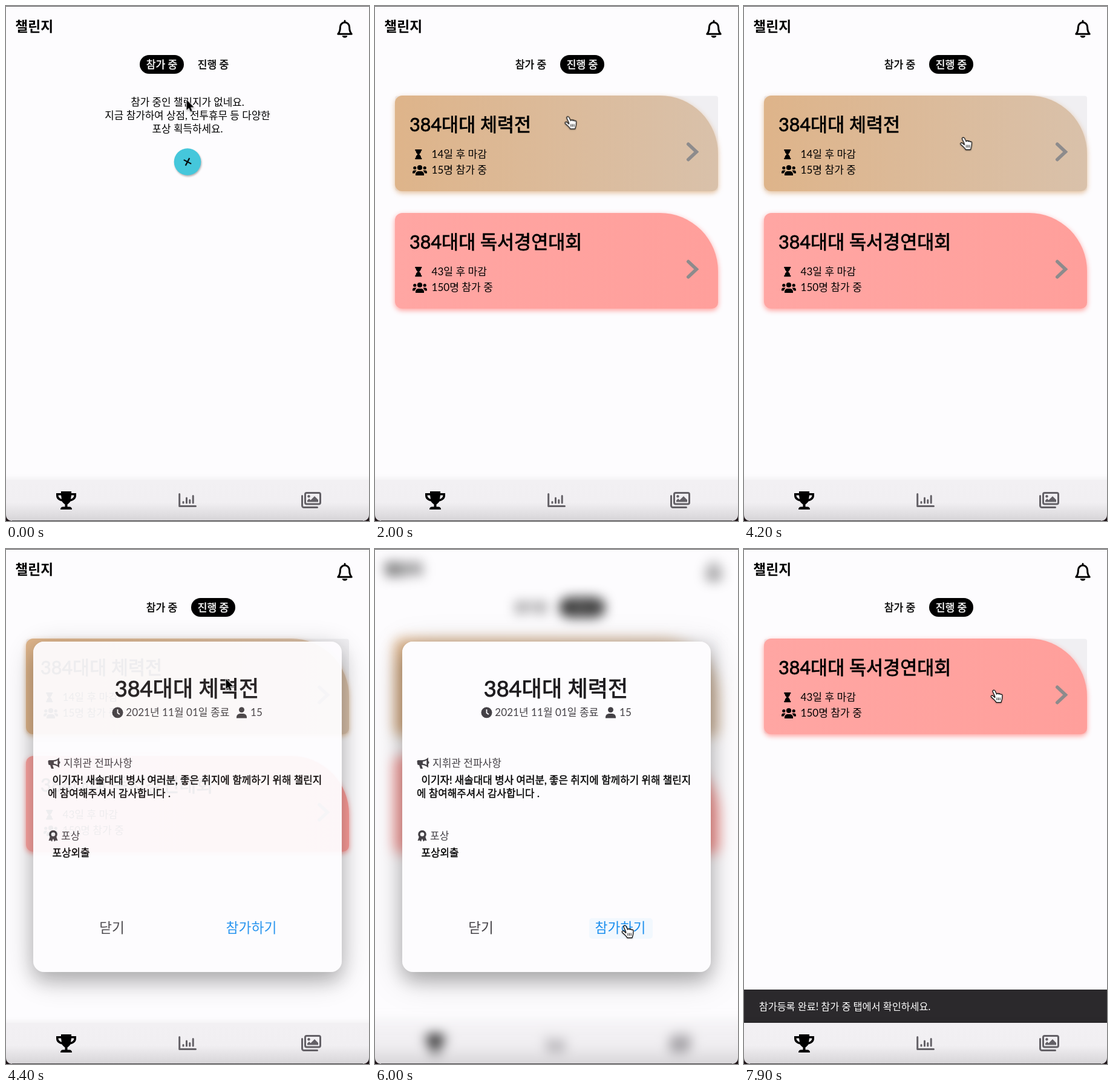
Recreate the animation shown at these times as an HTML page. Size 600x851 px, loop 8 s.

```html
<!DOCTYPE html>
<html lang="ko">
<head>
<meta charset="utf-8">
<title>챌린지</title>
<style>
html, body { margin: 0; width: 100%; height: 100%; overflow: hidden; background: #fdfcfe; }
svg { display: block; width: 600px; height: 851px; }
text {
  font: 17.1px Lato, "Noto Sans CJK KR", "Noto Sans CJK JP", "Noto Sans CJK", sans-serif;
  fill: currentColor; white-space: pre;
}
.body { font-size: 16.85px; }
.mid { text-anchor: middle; }
.medium { stroke: currentColor; stroke-width: .025em; }
.line { fill: none; stroke: currentColor; stroke-width: 3; stroke-linecap: round; stroke-linejoin: round; }
.icon { fill: currentColor; }
.tan { filter: drop-shadow(0 3px 4px rgba(222, 180, 138, .85)); }
.pink { filter: drop-shadow(0 3px 4px rgba(255, 150, 146, .9)); }

/* Every track shares one 8 s clock: 1% = 80 ms */
.a { animation: 8s linear infinite; }
.step { animation-timing-function: step-end; }

#page { animation-name: blur; }
@keyframes blur { 0% { filter: none } 56.25% { filter: blur(10px) } 81.25%, 100% { filter: none } }

#empty { animation-name: empty; }
@keyframes empty { 0% { visibility: visible } 16.25%, 100% { visibility: hidden } }

#tabs { animation-name: tabs; }
@keyframes tabs {
  0% { visibility: visible } 16.25% { visibility: hidden } 21.875% { visibility: visible }
  81.25% { visibility: hidden } 86.875%, 100% { visibility: visible }
}
#pill { animation-name: pill; }
@keyframes pill { 0% { transform: none } 16.25%, 100% { transform: translateX(85px) } }
#tabA { animation-name: tabA; }
@keyframes tabA { 0% { color: #fff } 16.25%, 100% { color: #000 } }
#tabB { animation-name: tabB; }
@keyframes tabB { 0% { color: #000 } 16.25%, 100% { color: #fff } }

#first { animation-name: first; }
@keyframes first { 0% { visibility: hidden } 21.875% { visibility: visible } 81.25%, 100% { visibility: hidden } }
#second { animation-name: second; }
@keyframes second {
  0% { visibility: hidden; transform: translateY(194px) }
  21.875% { visibility: visible; transform: translateY(194px) }
  81.25% { visibility: hidden; transform: none }
  86.875%, 100% { visibility: visible; transform: none }
}
#hover { animation-name: hover; }
@keyframes hover {
  0% { visibility: hidden } 21.875% { visibility: visible } 26% { visibility: hidden }
  40.6% { visibility: visible } 81.25% { visibility: hidden } 95%, 100% { visibility: visible }
}

#plus { animation-name: plus; }
@keyframes plus { from { transform: rotate(28deg) } to { transform: rotate(748deg) } }

#loader { animation-name: loader; }
@keyframes loader {
  0% { visibility: hidden } 16.25% { visibility: visible } 21.875% { visibility: hidden }
  81.25% { visibility: visible } 86.875%, 100% { visibility: hidden }
}
#turn { animation-name: turn; }
@keyframes turn {
  0%, 16.25% { transform: rotate(-90deg) } 24.58% { transform: rotate(63deg) }
  24.59%, 81.25% { transform: rotate(-90deg) } 89.58%, 100% { transform: rotate(63deg) }
}
#arc { animation-name: arc; animation-timing-function: cubic-bezier(.4, 0, .2, 1); }
@keyframes arc {
  0%, 16.25% { stroke-dasharray: 0 400 } 24.58% { stroke-dasharray: 270 400 }
  24.59%, 81.25% { stroke-dasharray: 0 400 } 89.58%, 100% { stroke-dasharray: 270 400 }
}

#toast { animation-name: toast; animation-timing-function: cubic-bezier(.4, 0, .2, 1); }
@keyframes toast { 0%, 81.25% { transform: translateY(55px) } 84.375%, 100% { transform: none } }
#note { animation-name: note; }
@keyframes note { 0%, 82.5% { opacity: 0 } 84.375%, 100% { opacity: 1 } }

#dialog { animation-name: dialog; }
@keyframes dialog {
  0% { opacity: 0 }
  53.5% { opacity: 0; animation-timing-function: ease-out }
  55.375% { opacity: 1 }
  81.25% { opacity: 1; animation-timing-function: ease-in }
  83.125%, 100% { opacity: 0 }
}
.near { filter: drop-shadow(0 14px 15px rgba(0, 0, 0, .22)); }
.far { filter: drop-shadow(0 12px 27px rgba(0, 0, 0, .2)); }
#glow { animation-name: glow; }
@keyframes glow { 0% { fill: #fdfcfe } 66% { fill: #f2f8fe } 80%, 100% { fill: #dfeefa } }

#cursor { animation-name: move; animation-timing-function: ease-in-out; }
@keyframes move {
  0%, 2% { transform: translate(298.5px, 154.5px) }
  9%, 22.5% { transform: translate(301px, 243px) }
  28% { transform: translate(345px, 94px) }
  33% { transform: translate(350px, 92px) }
  37.5%, 39% { transform: translate(388px, 119px) }
  45%, 57% { transform: translate(363.5px, 214px) }
  67%, 91.5% { transform: translate(414px, 619px) }
  97.5%, 100% { transform: translate(414px, 230px) }
}
#arrow { animation-name: arrow; }
@keyframes arrow {
  0% { opacity: 1 } 6.5% { opacity: 0 } 26% { opacity: 1 } 27.5% { opacity: 0 } 34.5% { opacity: 1 }
  40.6% { opacity: 0 } 53.75% { opacity: 1 } 66% { opacity: 0 } 81.25% { opacity: 1 } 95%, 100% { opacity: 0 }
}
#hand { animation-name: hand; }
@keyframes hand {
  0% { opacity: 0 } 6.5% { opacity: 1 } 26% { opacity: 0 } 27.5% { opacity: 1 } 34.5% { opacity: 0 }
  40.6% { opacity: 1 } 53.75% { opacity: 0 } 66% { opacity: 1 } 81.25% { opacity: 0 } 95%, 100% { opacity: 1 }
}
</style>
</head>
<body>
<svg viewBox="0 0 600 851">
  <defs>
    <linearGradient id="tanFill"><stop stop-color="#deb48a"/><stop offset="1" stop-color="#d9c1aa"/></linearGradient>
    <linearGradient id="pinkFill"><stop stop-color="#ffa6a3"/><stop offset="1" stop-color="#ff9f9b"/></linearGradient>
    <linearGradient id="navFill" x2="0" y2="1">
      <stop stop-color="#f2f0f3"/><stop offset=".55" stop-color="#f1eff2"/><stop offset="1" stop-color="#d6d4d7"/>
    </linearGradient>
    <path id="card" d="M45 148H471A96 96 0 0 1 567 244V296A10 10 0 0 1 557 306H45A12 12 0 0 1 33 294V160A12 12 0 0 1 45 148Z"/>
    <rect id="sheet" x="45" y="153" width="510" height="546" rx="18" fill="#fdfcfe"/>
    <g id="marks">
      <path d="M66.3 237h11v2.3h-11zM66.3 250.9h11v2.3h-11zM67.4 239h8.8c0 3.8-2.4 4.8-3 6.1.6 1.3 3 2.3 3 6.1h-8.8c0-3.8 2.4-4.8 3-6.1-.6-1.3-3-2.3-3-6.1z"/>
      <circle cx="74" cy="267" r="4.1"/>
      <path d="M67 280v-2a5 5 0 0 1 5-5h4a5 5 0 0 1 5 5v2z"/>
      <circle cx="65.8" cy="267.5" r="2.6"/>
      <circle cx="82.2" cy="267.5" r="2.6"/>
      <path d="M62 276.5v-1.5a3.5 3.5 0 0 1 3.5-3.5h3l-3 5zM86 276.5v-1.5a3.5 3.5 0 0 0-3.5-3.5h-3l3 5z"/>
      <path d="M517.8 228.3 531.3 241 517.8 253.7" fill="none" stroke="#8d8b8c" stroke-width="5.6" stroke-linecap="round"/>
    </g>
  </defs>
  <rect width="600" height="851" fill="#fdfcfe"/>

  <g id="page" class="a step">
    <text x="15.3" y="42" style="font-size:22.8px;font-weight:700">챌린지</text>
    <path class="line" d="M548.8 46.3h22.4c-2.6-3-3.6-6-3.6-11.6a7.6 7.6 0 0 0-15.2 0c0 5.6-1 8.6-3.6 11.6zM560 24.5v2"/>
    <path d="M555.8 49h8.4a4.2 3.4 0 0 1-8.4 0z"/>

    <g id="tabs" class="a step">
      <rect id="pill" class="a step" x="221" y="81" width="73" height="31" rx="15.5"/>
      <text id="tabA" class="a step mid medium" x="257.5" y="102.7">참가 중</text>
      <text id="tabB" class="a step mid medium" x="342.5" y="102.7">진행 중</text>
    </g>

    <g id="empty" class="a step">
      <text class="mid body" x="300" y="164.5">참가 중인 챌린지가 없네요.</text>
      <text class="mid body" x="300" y="186.5">지금 참가하여 상점, 전투휴무 등 다양한</text>
      <text class="mid body" x="300" y="208.5">포상 획득하세요.</text>
      <circle cx="300" cy="257.5" r="22.3" fill="#45c7db" style="filter:drop-shadow(1px 2px 1.5px rgba(0,0,0,.3))"/>
      <g transform="translate(300 257.5)">
        <path id="plus" class="a" d="M-7 0H7M0-7V7" stroke="#000" stroke-width="2.2"/>
      </g>
    </g>

    <rect id="hover" class="a step" x="33" y="148.5" width="534" height="157" rx="4" fill="#f0eff2"/>
    <g id="first" class="a step">
      <use href="#card" class="tan" fill="url(#tanFill)"/>
      <use href="#marks"/>
      <text class="medium" x="57" y="207" style="font-size:30.5px">384대대 체력전</text>
      <text x="93.5" y="251">14일 후 마감</text>
      <text x="93.5" y="276.7">15명 참가 중</text>
    </g>
    <g id="second" class="a step">
      <use href="#card" class="pink" fill="url(#pinkFill)"/>
      <use href="#marks"/>
      <text class="medium" x="57" y="207" style="font-size:30.5px">384대대 독서경연대회</text>
      <text x="93.5" y="251">43일 후 마감</text>
      <text x="93.5" y="276.7">150명 참가 중</text>
    </g>

    <g id="loader" class="a step" transform="translate(300 426)">
      <g id="turn" class="a">
        <circle id="arc" class="a" r="22" pathLength="360" fill="none" stroke="#1c8cee" stroke-width="4.5"/>
      </g>
    </g>

    <g id="toast" class="a">
      <rect y="728" width="600" height="60" fill="#2b292c"/>
      <text id="note" class="a" x="24.7" y="762" style="font-size:16.3px;color:#fff">참가등록 완료! 참가 중 탭에서 확인하세요.</text>
    </g>

    <rect x="-20" y="783" width="640" height="100" fill="#d6d4d7" style="filter:drop-shadow(0 -2px 5px rgba(0,0,0,.05))"/>
    <rect x="-20" y="783" width="640" height="68" fill="url(#navFill)"/>
    <path d="M91 802h17v3h8v4c0 5-4 8.5-9.5 9.5-1.5 2.5-3.5 4-5 5v4h3c3 0 4.5 1.5 4.5 4.5h-19c0-3 1.500-4.5 4.5-4.500h3v-4c-1.5-1-3.5-2.500-5-5-5.500-1-9.500-4.500-9.500-9.500v-4h8zM91 808.5h-4.500c0 3 2 5 5.500 6.200zM108 808.5l-1 6.200c3.500-1.200 5.500-3.200 5.500-6.200z" fill-rule="evenodd"/>
    <g color="#636066">
      <path class="line" d="M286.7 806.5V826.5H313.5M293 819.5v1.5M298.5 813v8M303.8 816.5v4.5M309.2 809.5v11.5"/>
      <rect class="line" x="494.5" y="804.5" width="25" height="18.5" rx="2.5"/>
      <path class="line" d="M489.5 809.5v16a3 3 0 0 0 3 3h22"/>
      <circle class="icon" cx="500.5" cy="810.3" r="2.2"/>
      <path class="icon" d="M498 819.5v-2.5l3-3 2.5 2.5 6.5-6.5 6 6v3.5z"/>
    </g>
  </g>

  <g id="dialog" class="a">
    <use href="#sheet" class="far"/>
    <use href="#sheet" class="near"/>
    <text class="mid medium" x="299" y="243.5" style="font-size:36.2px;color:#1e1c1f">384대대 체력전</text>
    <g color="#444146">
      <circle class="icon" cx="184.5" cy="270.3" r="9"/>
      <path d="M184.5 265v5.8l3.4 2.5" fill="none" stroke="#fdfcfe" stroke-width="1.8"/>
      <text x="198.3" y="276.3">2021년 11월 01일 종료</text>
      <circle class="icon" cx="389.5" cy="265.8" r="4.5"/>
      <path class="icon" d="M381 279.5v-2a6 6 0 0 1 6-5.5h5a6 6 0 0 1 6 5.5v2z"/>
      <text x="404" y="276.3">15</text>

      <path class="icon" d="M69.5 351a2 2 0 0 1 2-2h6c4 0 7.5-1.5 10.5-4.5v6c2 .5 2 4 0 4.5v6.5c-3-3-6.5-4.5-10.5-4.5h-.5l2 6h-4l-2-6h-1a2 2 0 0 1-2-2z"/>
      <path d="M79 351.3c2.5-.3 4.5-1 6.3-2.2v7.8c-1.8-1.2-3.8-1.9-6.3-2.2z" fill="#fdfcfe"/>
      <text x="95" y="359.7" style="font-size:17px">지휘관 전파사항</text>

      <path class="icon" d="M73 475l-2.5 7 3.5-.4 2 2 2-5 2 5 2-2 3.5.4-2.5-7z"/>
      <circle class="icon" cx="78" cy="471.5" r="6.8"/>
      <circle cx="78" cy="471.5" r="3.3" fill="#fdfcfe"/>
      <text x="91" y="480" style="font-size:17px">포상</text>
      <text class="mid" x="175" y="634.3" style="font-size:22.6px">닫기</text>
    </g>
    <text class="body medium" x="76.5" y="387.5">이기자! 새솔대대 병사 여러분, 좋은 취지에 함께하기 위해 챌린지</text>
    <text class="body medium" x="69" y="409.5">에 참여해주셔서 감사합니다 .</text>
    <text class="body medium" x="76.5" y="508">포상외출</text>
    <rect id="glow" class="a step" x="354" y="610" width="105" height="34" rx="5"/>
    <text class="mid" x="405.5" y="634.3" style="font-size:22.8px;color:#1c8fee">참가하기</text>
  </g>

  <path d="M0 .5H600" stroke="#5a595b"/>
  <path d="M10 850.5H590" stroke="#4a484b"/>
  <path d="M0 840Q0 851 12 851H0ZM600 840Q600 851 588 851H600Z" fill="#1c1216"/>

  <g id="cursor" class="a">
    <path id="arrow" class="a step" d="M0 .5V17.5L3.9 14 6.5 20 9.2 18.8 6.600 12.800H12Z" stroke="#fff" stroke-width="1.8" paint-order="stroke" style="filter:drop-shadow(0 1px 1px rgba(0,0,0,.3))"/>
    <g id="hand" class="a step" stroke="#111" stroke-width="1.3" stroke-linejoin="round" style="filter:drop-shadow(0 1px 1px rgba(0,0,0,.25))">
      <path d="M.5 13-2.5 6.5C-4 3.5-.5 2 1 4.5L3.8 10C4.5 8 7 8 7.5 10 8 8.5 10 8.7 10.3 10.6 11 9.6 13 10 13 12 13 17 12.5 19 11 23.5H3C2 21-2 18-5 15-7 12.5-4 11-2 13L.8 15.5Z" fill="#fff"/>
      <path d="M4 15.5v4.5M6.6 15.5v4.5M9.2 15.5v4.5" stroke-width="1"/>
    </g>
  </g>
</svg>
</body>
</html>
```
